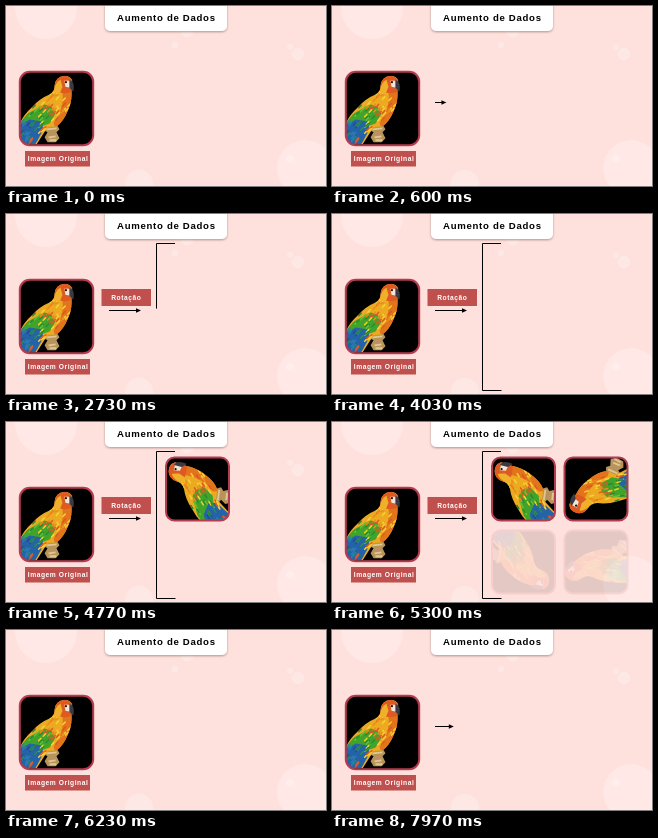
These frames come from a looping animation (320 px wide and 180 px high, 8 s). An HTML page:

```html
<!DOCTYPE html>
<html lang="pt">
<head>
<meta charset="utf-8">
<title>Aumento de Dados</title>
<style>
  html, body { margin: 0; width: 100%; height: 100%; overflow: hidden; background: #fee0dc; }
  svg { display: block; width: 100vw; height: 100vh; }
  text { font-family: "Liberation Sans", Arial, sans-serif; font-weight: bold; text-anchor: middle; }
  .title { font-size: 9.6px; letter-spacing: .7px; fill: #000; }
  .label { font-size: 6.7px; letter-spacing: .54px; fill: #fff; }
  .tag { fill: #c0504d; }
  .bubbles { fill: #fff; fill-opacity: .25; }
  .ink { fill: none; stroke: #000; stroke-width: 1; }
</style>
</head>
<body>
<svg viewBox="0 0 320 180" xmlns="http://www.w3.org/2000/svg">
  <defs>
    <filter id="shadow" x="-10%" y="-30%" width="120%" height="170%">
      <feDropShadow dx="0" dy="1" stdDeviation="1" flood-color="#74504c" flood-opacity=".55"/>
    </filter>
    <clipPath id="bodyClip"><path d="M35 14 Q36 5 45 4 Q51 4 53 9 L52 19 Q53 30 48 40 Q44 50 37 55 L28 56 L17 73 H-12 L0 52 Q4 43 12 36 Q20 27 30 23 Q35 20 35 14Z"/></clipPath>
    <!-- local box of 74 x 74 -->
    <g id="parrot">
      <path d="M25 55 L37 53 L40 58 L37 61 L40 67 L36 71 L28 71 L25 66 L28 61 L24 59Z" fill="#b8945c"/>
      <path d="M27 58 L37 57 M29 66 L36 65 M30 69 L37 69" stroke="#e0c792" stroke-width="1.8"/>
      <g clip-path="url(#bodyClip)">
        <rect x="-12" width="86" height="76" fill="#ecaa20"/>
        <path d="M43 20 L54 18 V46 L36 58 L34 51 Q45 38 43 20Z" fill="#e2741c"/>
        <path d="M25 33 Q34 34 36 42 L30 52 L22 55 L8 64 L-4 56 L8 42Z" fill="#3fa32c"/>
        <path d="M10 48 L22 50 L24 58 L14 76 H-12 L-4 56Z" fill="#2563a8"/>
        <g id="feathers" stroke-width="1.5" stroke-linecap="round"/>
        <path d="M35 14 Q36 4 46 3 L55 9 V19 Q44 24 35 19Z" fill="#dd5a20"/>
        <path d="M34 20 Q36 10 41 8 L43 15 L40 23Z" fill="#efb02a"/>
      </g>
      <path d="M45 9 L51 9 L51 16 L46 15Z" fill="#eee6da"/>
      <circle cx="46.5" cy="10.5" r="1.1" fill="#161616"/>
      <path d="M50 8 Q56 10 54 20 L50 16Z" fill="#3a3b42"/>
    </g>
  </defs>

  <rect width="320" height="180" fill="#fee0dc"/>
  <g class="bubbles">
    <circle cx="40" cy="2" r="31"/><circle cx="299" cy="162" r="28"/>
    <circle cx="292" cy="48" r="6.5"/><circle cx="284" cy="41" r="3"/>
    <circle cx="133" cy="178" r="14"/><circle cx="284" cy="153" r="4"/>
    <circle cx="181" cy="25" r="6.5"/><circle cx="169" cy="39" r="3.5"/>
  </g>
  <rect x="99" y="-8" width="122" height="33" rx="5" fill="#fff" filter="url(#shadow)"/>
  <text class="title" x="160.4" y="15">Aumento de Dados</text>

  <g id="fixed">
    <rect class="tag" x="19" y="145" width="65" height="15.5"/>
    <text class="label" x="52.1" y="155.4">Imagem Original</text>
  </g>

  <g id="steps">
    <g id="arrow">
      <path id="shaft" class="ink"/>
      <path id="tip" d="M0 0 L-5 -2.2 V2.2Z"/>
    </g>
    <g id="rotation">
      <rect class="tag" x="95.5" y="75" width="49.5" height="17"/>
      <text class="label" x="120.3" y="86">Rotação</text>
    </g>
    <path id="bracket" class="ink" pathLength="1" stroke-dasharray="1 2" d="M169 29.5 H150.5 V176.5 H169.5"/>
  </g>
</svg>
<script>
const NS = "http://www.w3.org/2000/svg";
const $ = id => document.getElementById(id);

function add(parent, tag, attrs) {
  const node = document.createElementNS(NS, tag);
  for (const key in attrs) node.setAttribute(key, attrs[key]);
  return parent.appendChild(node);
}

let seed = 7;
const random = () => (seed = seed * 16807 % 2147483647) / 2147483647;

// Short strokes along the body, coloured by how far down the back they lie
for (let i = 0; i < 80; i++) {
  const along = random(), side = random() - .5;
  const x = 44 - 42 * along + 16 * side;
  const y = 24 + 40 * along + 20 * side;
  const hues = along < .4 || side > .3 ? ["#f6d13a", "#ee8a1d", "#dd5a20"]
    : along < .7 ? ["#f2d02c", "#6cbf2c", "#2a8a30"]
    : ["#2a8a50", "#2c7fae", "#1d4c94"];
  add($("feathers"), "path", {
    d: `M${x} ${y} l-2.4 2.6`, stroke: hues[Math.floor(random() * hues.length)]
  });
}

function picture(parent, x, y, size, turn = 0, zoom = 1, dx = 0, dy = 0) {
  const group = add(parent, "g", {});
  const id = `frame${x}-${y}`, half = size / 2;
  const box = { x, y, width: size, height: size, rx: size / 7.4 };
  add(add(group, "clipPath", { id }), "rect", box);
  add(group, "rect", box);
  const inside = add(group, "g", { "clip-path": `url(#${id})` });
  add(inside, "use", {
    href: "#parrot",
    transform: `translate(${x + half + dx} ${y + half + dy}) rotate(${turn}) scale(${zoom * size / 74}) translate(-37 -37)`
  });
  add(group, "rect", { ...box, fill: "none", stroke: "#b23c50", "stroke-width": 2 });
  return group;
}

picture($("fixed"), 13.8, 65.8, 73.4);

const fades = [
  [$("rotation"), 1680],
  [picture($("steps"), 160, 35.5, 63, -76, 1.2, 2, -4), 4210],
  [picture($("steps"), 232.5, 35.5, 63, 210, 1.2, 2, -2), 4780],
  [picture($("steps"), 160, 108.5, 63, 105, 1.2, -5, 4), 5270],
  [picture($("steps"), 232.5, 108.5, 63, 230, 1.2, 2, 0), 5270]
];

const progress = (t, start, length) => Math.min(1, Math.max(0, (t - start) / length));
const easeInOut = u => (1 - Math.cos(Math.PI * u)) / 2;

function draw(t) {
  const reach = progress(t, 30, 1600);
  const end = 103 + 32 * reach;
  $("arrow").style.visibility = reach > 0 ? "visible" : "hidden";
  $("shaft").setAttribute("d", `M103 96.5 H${Math.max(103, end - 3)}`);
  $("tip").setAttribute("transform", `translate(${end} 96.5) scale(${Math.min(1, (end - 103) / 5)} 1)`);

  for (const [node, start] of fades) node.style.opacity = progress(t, start, 300);

  const drawn = easeInOut(progress(t, 1960, 1640));
  $("bracket").style.visibility = drawn > 0 ? "visible" : "hidden";
  $("bracket").setAttribute("stroke-dashoffset", 1 - drawn);

  $("steps").style.opacity = 1 - progress(t, 5910, 320);
}

function tick() {
  const t = performance.now() % 8000;
  draw(t < 7000 ? t : t - 7000);
  requestAnimationFrame(tick);
}
tick();
</script>
</body>
</html>
```
